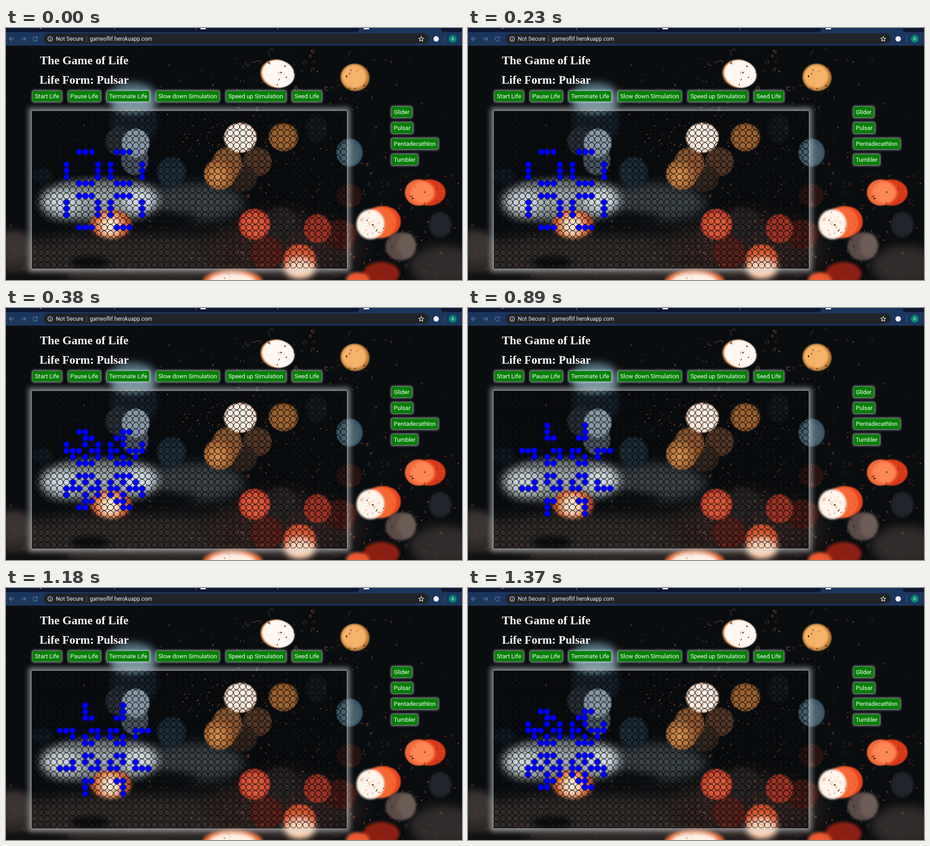
An HTML page with a canvas for the animation above (1.47 s loop, 1006x556 px).

```html
<!DOCTYPE html>
<html lang="en">
<head>
<meta charset="utf-8">
<title>The Game of Life</title>
<style>
html, body { margin: 0; width: 100%; height: 100%; overflow: hidden; background: #0a0d10; }
#stage { position: relative; width: 1006px; height: 556px; overflow: hidden; }
#stage > * { position: absolute; }
#photo, #bar { left: 0; top: 0; }
#bar { font-family: Roboto, sans-serif; fill: #f1f3f4; }
h1 {
  left: 0; width: 345px; margin: 0; text-align: center; white-space: nowrap;
  font: bold 26px/30px "Liberation Serif", serif; color: #fdfaf5;
}
button {
  box-sizing: border-box; padding: 0; border: 0; border-radius: 2px;
  background: #008000; color: #fff; white-space: nowrap;
  font: 13.2px/23px Roboto, sans-serif; height: 23px;
  box-shadow: 0 0 4px 1.5px rgba(235, 240, 242, .72);
}
#board {
  left: 57px; top: 183px; width: 695px; height: 347.5px;
  box-shadow: 0 0 2px 1px rgba(230, 235, 238, .4), 0 0 11px 7px rgba(205, 210, 213, .57);
  animation: nudge 1470ms step-end infinite;
}
#board svg { display: block; overflow: visible; }
.gen { fill: #00f; stroke: #0000b8; stroke-width: .5; animation: 1470ms step-end infinite; }
#g0 { animation-name: first; }
#g1 { animation-name: second; }
#g2 { animation-name: third; }
#form { animation: settle 1470ms step-end infinite; }
@keyframes first { 0% { opacity: 1 } 25.85%, 100% { opacity: 0 } }
@keyframes second { 0% { opacity: 0 } 60.544% { opacity: 1 } 93.197%, 100% { opacity: 0 } }
@keyframes third { 0% { opacity: 0 } 25.85% { opacity: 1 } 60.544% { opacity: 0 } 93.197%, 100% { opacity: 1 } }
@keyframes nudge {
  0% { transform: none }
  60.544% { transform: translate(-.4px, -.4px) }
  93.197%, 100% { transform: translate(-.8px, -.8px) }
}
@keyframes settle { 0% { transform: none } 93.197%, 100% { transform: scale(.99) } }
</style>
</head>
<body>
<div id="stage">
  <canvas id="photo" width="1006" height="556"></canvas>
  <svg id="bar" width="1006" height="40">
    <path fill="#1b365d" d="M0 0H1006V39H0z"/>
    <path fill="#0b1733" d="M0 0H779V4Q779 9 773 9H0zM960 0H1006V9H966Q960 9 960 4z"/>
    <path stroke="#8795aa" d="M239.500 0V4M419.500 0V4M599.500 0V4"/>
    <path fill="#e8912d" d="M73 0H80L77 2z"/>
    <path fill="#e8ebef" d="M429 0H441V3H429zM789 0H801V3H789z"/>
    <rect x="83" y="12" width="850" height="23" rx="11.500" fill="#202427"/>
    <g fill="none" stroke="#58779d" stroke-width="1.400">
      <path d="M18 24H7.500M12.500 19L7.500 24L12.500 29"/>
      <path d="M33 24H43.500M38.500 19L43.500 24L38.500 29"/>
      <path d="M68.500 20.500A5 5 0 1 0 69.500 25.500M69.500 18.500V22.500H65.500"/>
    </g>
    <g fill="none" stroke="#f1f3f4" stroke-width="1.200">
      <circle cx="97.500" cy="24" r="5"/>
      <path d="M97.500 23.300V27M97.500 20.800V22"/>
      <path d="M916 18.800L917.500 22.300L921.300 22.600L918.400 25.100L919.300 28.800L916 26.800L912.700 28.800L913.600 25.100L910.700 22.600L914.500 22.300z"/>
    </g>
    <path stroke="#777c80" d="M177.500 17V31"/>
    <path stroke="#506582" d="M967.500 17V31"/>
    <text x="110" y="28.300" font-size="12.400">Not Secure</text>
    <text x="185" y="28.300" font-size="12">gameoflif.herokuapp.com</text>
    <circle cx="949" cy="24" r="6" fill="#f4f5f6"/>
    <circle cx="985.500" cy="24" r="8.500" fill="#00897b"/>
    <text x="985.500" y="27.300" font-size="9" text-anchor="middle">A</text>
  </svg>
  <h1 style="top:57px">The Game of Life</h1>
  <h1 id="form" style="top:100px;font-size:25.500px">Life Form: Pulsar</h1>
  <div id="board"><svg id="cells" width="695" height="348"></svg></div>
</div>
<script>
const stage = document.getElementById('stage');
const ctx = document.getElementById('photo').getContext('2d');

// Buttons
function addButton(label, x, y, w) {
  const b = document.createElement('button');
  b.textContent = label;
  b.style.cssText = `left:${x}px;top:${y}px;width:${w}px`;
  stage.append(b);
}
[['Start Life', 59, 63], ['Pause Life', 137.5, 70], ['Terminate Life', 223, 93],
 ['Slow down Simulation', 331.5, 138], ['Speed up Simulation', 485.5, 131],
 ['Seed Life', 631.5, 64.5]].forEach(([t, x, w]) => addButton(t, x, 138.5, w));
[['Glider', 44], ['Pulsar', 46], ['Pentadecathlon', 101.5], ['Tumbler', 57]]
  .forEach(([t, w], i) => addButton(t, 851, 173.5 + i * 35.2, w));

// Night street seen through a wet window
let seed = 17;
const rnd = () => (seed = (seed * 16807) % 2147483647) / 2147483647;
const bell = () => rnd() + rnd() + rnd() - 1.5;

function blob(x, y, rx, ry, fill, blur = 1, tilt = 0) {
  ctx.filter = blur ? `blur(${blur}px)` : 'none';
  ctx.fillStyle = fill;
  ctx.beginPath();
  ctx.ellipse(x, y, rx, ry, tilt, 0, 7);
  ctx.fill();
}
function fade(x, y, r, ...colors) {
  const g = ctx.createRadialGradient(x, y, 0, x, y, r);
  colors.forEach((c, i) => g.addColorStop(i / (colors.length - 1), c));
  return g;
}
function drop(x, y, r, hue, light) {
  const tilt = rnd() * 3;
  ctx.filter = 'none';
  ctx.beginPath();
  ctx.ellipse(x, y, r, r * (.4 + rnd() * .4), tilt, 0, r > 2 ? 3 + rnd() * 3 : 7);
  ctx.strokeStyle = ctx.fillStyle = `hsla(${hue},65%,${light}%,${.45 + rnd() * .5})`;
  ctx.lineWidth = .9;
  r > 1.7 ? ctx.stroke() : ctx.fill();
}
function spray(n, x, y, sx, sy, size, light = 55) {
  while (n--) drop(x + bell() * sx, y + bell() * sy, .5 + rnd() * rnd() * size, 12 + rnd() * 14, light - 15 + rnd() * 22);
}

ctx.fillStyle = '#0a0d10';
ctx.fillRect(0, 0, 1006, 556);

// Road haze and dark patches
blob(290, 510, 340, 58, '#302b29', 14);
blob(610, 490, 170, 75, '#302422', 20);
blob(15, 480, 42, 34, '#3b3532', 8);
blob(965, 525, 75, 45, '#302b2a', 10);
blob(410, 385, 115, 42, '#3b4348', 12);
blob(330, 425, 95, 22, '#0d1012', 9);
blob(185, 517, 42, 13, '#0c0d0e', 6);
blob(75, 548, 70, 10, '#100f10', 6);

// Cold lights
blob(282, 205, 52, 55, '#17222b', 6);
blob(280, 154, 54, 34, '#54717e', 8);
blob(281, 166, 45, 14, '#78949e', 8);
blob(250, 250, 31, 32, '#252e36');
blob(284, 290, 30, 35, '#4a5661');
blob(286, 254, 30.5, 32, '#8999a8');
blob(365, 318, 32, 33, '#1d2c37', 2);
blob(80, 326, 24, 18, '#101a21', 3);
blob(685, 222, 24, 32, '#12191f', 3);
blob(758, 275, 29, 31, '#375362');
blob(757, 277, 24, 26, '#45616d', 3);

// Headlights
blob(205, 382, 126, 44, '#828b90', 10);
blob(125, 385, 44, 30, '#c9d3d8', 12);
blob(292, 378, 40, 30, '#d0dae0', 11);
blob(207, 375, 45, 24, '#a5adb1', 12);
blob(205, 347, 90, 8, '#747b80', 7);
blob(232, 433, 46, 32, fade(230, 436, 46, '#fff4e5', '#fbd9bb', '#e5763f', '#a54428'), 3);

// Warm lights
blob(555, 295, 31.5, 32, '#533626');
blob(520, 331, 34, 30, '#35271f', 2);
blob(488, 299, 33, 36, '#89572f');
blob(472, 322, 35, 35, fade(466, 326, 40, '#d99858', '#bd783e', '#8f572f'));
blob(612, 241, 32.5, 31, '#8c562b');
blob(612, 242, 26, 25, '#9d6433', 2);
blob(517, 242, 36, 33, '#efc9ae');
blob(517, 242, 33, 30, '#fff0e5', 2);
blob(597, 101, 36, 31, '#d58a51', 1, .25);
blob(601, 101, 36, 30, '#fff7f1', 1, .25);
blob(770, 109, 32, 30, '#b97938', 1, .2);
blob(768, 107, 27, 26, '#f5b369', 2);

// Tail lights
blob(757, 370, 28, 27, '#27130f');
blob(738, 456, 36, 33, '#431a16', 2);
blob(575, 495, 36, 35, '#57201a', 2);
blob(606, 430, 40, 35, '#292526', 4);
blob(648, 512, 36, 35, '#d65730', 2);
blob(648, 530, 34, 24, '#ffd6b8', 7);
blob(548, 433, 35, 34, '#c6432c');
blob(548, 436, 27, 25, '#df5a3b', 4);
blob(687, 443, 30, 32, '#9e3525');
blob(934, 363, 36, 29, '#d9381a');
blob(910, 363, 30, 29, '#ee6738');
blob(919, 363, 27, 24, '#ff8753', 3);
blob(835, 427, 36, 34, '#e5441e');
blob(825, 429, 36, 35, '#f76734', 2);
blob(804, 433, 31, 33, '#fff4e9', 2);
blob(870, 482, 33, 31, '#584b47', 2);
blob(884, 480, 20, 27, '#6c5c56', 3);
blob(958, 434, 25, 28, '#20242a', 2);
blob(828, 542, 40, 26, '#8d2014', 3);
blob(776, 556, 26, 17, '#e95b30', 3);
blob(500, 560, 66, 27, '#e76a36', 3);
blob(499, 560, 52, 21, '#fff1e4', 4);

// Water drops
spray(150, 485, 252, 140, 45, 2, 60);
spray(130, 590, 120, 290, 130, 4, 48);
spray(240, 610, 330, 350, 210, 2.2, 50);
spray(330, 800, 460, 380, 170, 3.6, 52);
spray(220, 570, 475, 250, 140, 3.4, 49);
spray(170, 270, 500, 460, 80, 3.8, 38);
spray(110, 245, 270, 430, 250, 1.8, 26);
spray(50, 870, 250, 260, 260, 2.4, 45);
for (const [x, y, r] of [[556, 76, 7], [585, 54, 8], [533, 79, 5], [660, 76, 5], [677, 52, 4],
  [707, 134, 5], [640, 134, 6], [556, 179, 5], [510, 148, 6], [760, 57, 5], [517, 493, 6], [676, 92, 5]])
  drop(x, y, r, 22, 60);

// Dark beads over the brightest lights
for (const [x, y] of [[600, 101], [770, 109], [922, 363], [820, 430]])
  for (let i = 0; i < 12; i++)
    blob(x + bell() * 48, y + bell() * 42, .7 + rnd() * 2.4, .6 + rnd() * 1.3, '#30170fcc', 0, rnd() * 3);

// Board
const cols = 50, rows = 25, pitch = 13.9;
const ring = (c, r, rad) => {
  const x = (c + .5) * pitch, y = (r + .5) * pitch;
  return `M${x - rad} ${y}a${rad} ${rad} 0 1 0 ${2 * rad} 0a${rad} ${rad} 0 1 0 ${-2 * rad} 0`;
};
const all = Array.from({ length: cols * rows }, (_, i) => [i % cols, Math.floor(i / cols)]);
const path = (alive, rad) => all.filter(([c, r]) => alive(c, r)).map(([c, r]) => ring(c, r, rad)).join('');

// A pulsar is bars of three, mirrored about its centre at column 11, row 12
function pulsar(c, r) {
  const x = Math.abs(c - 11), y = Math.abs(r - 12);
  const bar = v => v > 1 && v < 5, edge = v => v === 1 || v === 6;
  return bar(x) && edge(y) || bar(y) && edge(x);
}
function step(alive) {
  const next = new Set();
  for (const [c, r] of all) {
    let n = 0;
    for (let i = 0; i < 9; i++)
      if (i !== 4 && alive(c + i % 3 - 1, r + Math.floor(i / 3) - 1)) n++;
    if (n === 3 || n === 2 && alive(c, r)) next.add(c + r * cols);
  }
  return (c, r) => next.has(c + r * cols);
}
let alive = pulsar;
let markup = `<path fill="none" stroke="#050607" stroke-width="1.1" stroke-opacity=".9" d="${path(() => true, 6.5)}"/>`;
for (let g = 0; g < 3; g++, alive = step(alive))
  markup += `<path class="gen" id="g${g}" d="${path(alive, 6.4)}"/>`;
document.getElementById('cells').innerHTML = markup;
</script>
</body>
</html>
```
